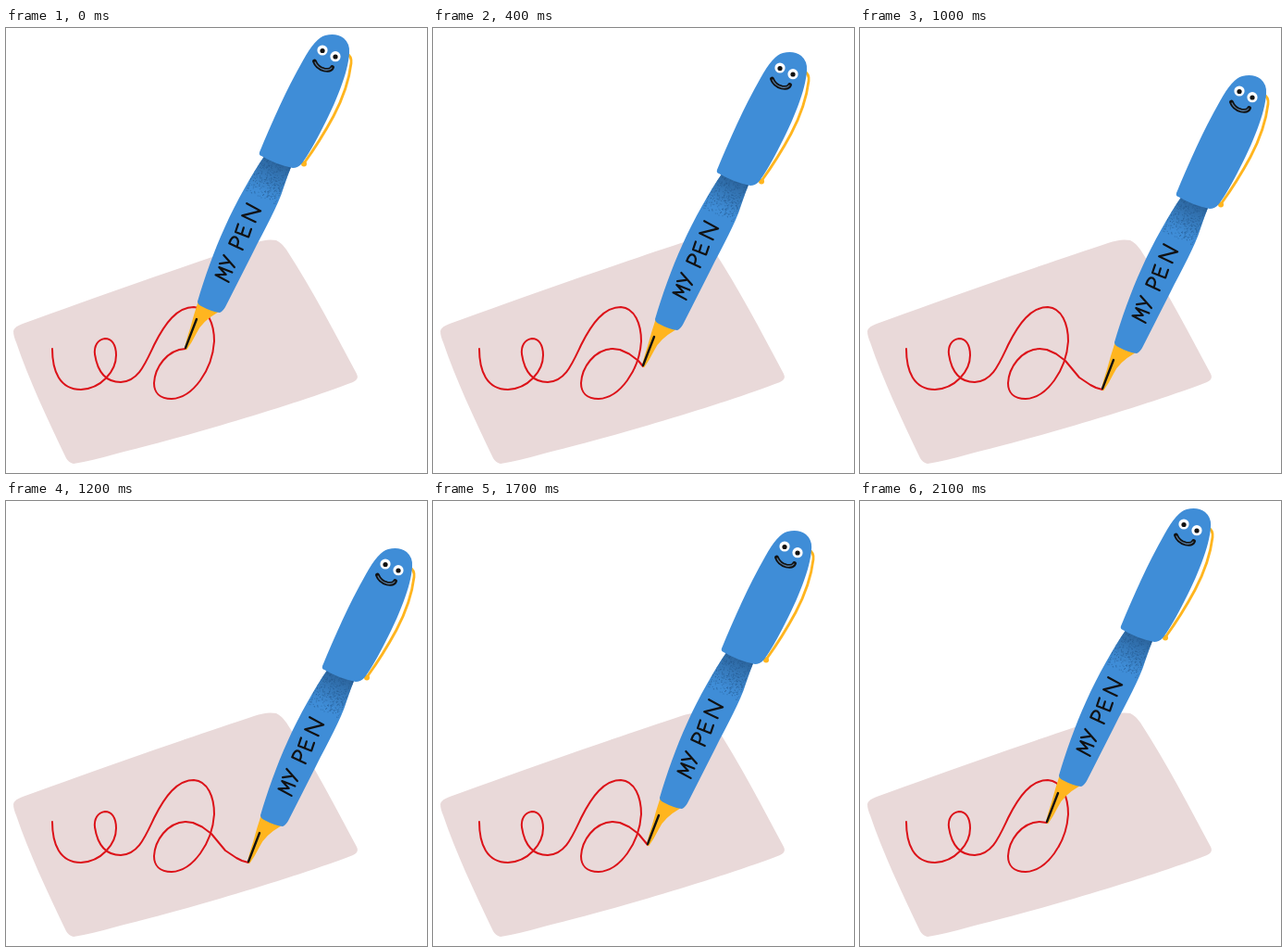
Recreate the animation shown at these times as an HTML page. Size 455 px wide and 480 px high, loop 2.2 s.

```html
<!DOCTYPE html>
<html lang="en">
<head>
<meta charset="utf-8">
<title>My pen</title>
<style>
  html, body { margin: 0; width: 100%; height: 100%; overflow: hidden; background: #fff; }
  svg { display: block; width: 455px; height: 480px; }
  .line { fill: none; stroke-linecap: round; stroke-linejoin: round; }
  .ink { stroke: #dc1219; stroke-width: 2; }
  .blue { fill: #3f8dd7; }
  .gold { fill: #ffb51f; }
</style>
</head>
<body>
<svg viewBox="0 0 455 480" role="img" aria-label="A smiling pen labelled MY PEN draws a looping line">
  <defs>
    <linearGradient id="shade" gradientUnits="userSpaceOnUse" x1="293" y1="143" x2="277" y2="177">
      <stop offset="0" stop-color="#285d92" stop-opacity=".85"/>
      <stop offset=".45" stop-color="#285d92" stop-opacity=".45"/>
      <stop offset="1" stop-color="#285d92" stop-opacity="0"/>
    </linearGradient>
    <path id="barrel" d="M280 137 C266 157 249 187 236 216 C225 240 214 271 207 295 Q207 298 211 300 Q222 306 231 307 Q234 306 237 301 C247 281 257 262 267 242 C280 216 294 192 300 172 Q304 160 308 150 Z"/>
    <clipPath id="inside"><use href="#barrel"/></clipPath>
  </defs>

  <path fill="#e9d9d9" d="M8 327 Q9 322 18 319 C95 291 195 256 268 232 Q282 227 292 229 Q297 231 303 239 C332 284 355 328 379 373 Q382 379 375 382 C310 407 190 442 120 459 Q92 467 73 470 Q68 469 65 464 C45 422 24 378 11 339 Q8 332 8 327 Z"/>

  <path class="line ink" d="M50 346 C50 370 58 390 81 390 C103 389 119 370 119 353 C119 341 114 335 107 335 C99 336 95 343 96 352 C99 371 108 382 124 382 C143 381 150 363 160 342 C172 318 185 301 203 301 C218 302 225 319 225 338 C223 369 202 399 179 400 C166 400 160 393 160 383 C161 366 174 347 194 346"/>
  <polyline id="tail" class="line ink"/>

  <g id="pen">
    <path class="gold" d="M208 294 Q203 309 199 324 Q195 336 193 345 L195 347.500 Q201 339 206 329 Q211 317 230 306 Z"/>
    <path class="line" stroke="#111" stroke-width="2.400" d="M206 314 L194 345"/>
    <use href="#barrel" class="blue"/>
    <g clip-path="url(#inside)">
      <path fill="url(#shade)" d="M255 125 H315 V190 H240 Z"/>
      <path id="grain" fill="none" stroke="#24578a" stroke-opacity=".55"/>
    </g>
    <path class="line" stroke="#ffb51f" stroke-width="2.800" d="M367 27 Q374 30 373 38 C371 55 364 76 354 95 Q340 121 322 146"/>
    <circle class="gold" cx="322" cy="146.500" r="3"/>
    <path class="blue" d="M274 134 C287 103 303 66 321 35 Q334 11 345 8 Q357 5 365 11 Q372 17 371 27 C370 47 357 80 340 112 Q327 137 319 147 Q315 151 310 151 Q291 147 276 138 Q273 137 274 134 Z"/>

    <g fill="#fff">
      <circle cx="342" cy="24" r="5.600"/>
      <circle cx="356" cy="30.700" r="5.600"/>
    </g>
    <g fill="#111">
      <circle cx="342" cy="24.500" r="2.600"/>
      <circle cx="356" cy="31" r="2.600"/>
    </g>
    <g class="line">
      <path stroke="#111" stroke-width="4.800" d="M333.500 36 Q336 43 344 45 Q351 46.500 352.500 42.500"/>
      <path stroke="#53789d" stroke-width="1.300" d="M334 37 Q336.500 43 344 45 Q350 46 352 43"/>
    </g>

    <g class="line" stroke="#111" stroke-width="2.200" transform="translate(241 273) rotate(-65)">
      <path d="M-1 0 L0 -16 L5 -6 L9 -16 L10 -1"/>
      <path d="M13 -17 L18 -9 M23 -17 L16 -1"/>
      <path d="M37 -1 L37 -17 Q46 -18 46 -13 Q45 -8 37 -8"/>
      <path d="M60 -17 L51 -16 L52 -1 L61 -2 M52 -9 L59 -10"/>
      <path d="M70 -1 L70 -17 L83 -1 L84 -18"/>
    </g>
  </g>
</svg>
<script>
  const STEP = 100, LAST = 11;
  // Nib positions along the end of the stroke
  const tips = [[194, 346], [202, 347], [212, 351.5], [222, 359], [227, 365], [232, 371],
                [237, 377], [243, 381], [249, 385], [255, 388], [262, 390], [270, 392]];
  const pen = document.getElementById('pen');
  const tail = document.getElementById('tail');

  // Spray shading below the cap, thinning out down the barrel
  let seed = 7;
  const rand = () => (seed = seed * 16807 % 2147483647) / 2147483647;
  let specks = '';
  for (let i = 0; i < 420; i++) {
    const along = 44 * rand() ** 1.6, across = 36 * (rand() - 0.5);
    const x = 293 - 0.43 * along + 0.9 * across;
    const y = 143 + 0.9 * along + 0.43 * across;
    specks += `M${x.toFixed(1)} ${y.toFixed(1)}h1`;
  }
  document.getElementById('grain').setAttribute('d', specks);

  let shown = -1;
  function draw(now) {
    const step = Math.floor(now / STEP) % (2 * LAST);
    const pose = step <= LAST ? step : 2 * LAST - step;
    if (pose !== shown) {
      const [x, y] = tips[pose];
      pen.setAttribute('transform', `translate(${x - tips[0][0]} ${y - tips[0][1]})`);
      tail.setAttribute('points', tips.slice(0, pose + 1).join(' '));
      shown = pose;
    }
  }
  let start;
  function tick(now) {
    start ??= now;
    draw(now - start);
    requestAnimationFrame(tick);
  }
  draw(0);
  requestAnimationFrame(tick);
</script>
</body>
</html>
```
